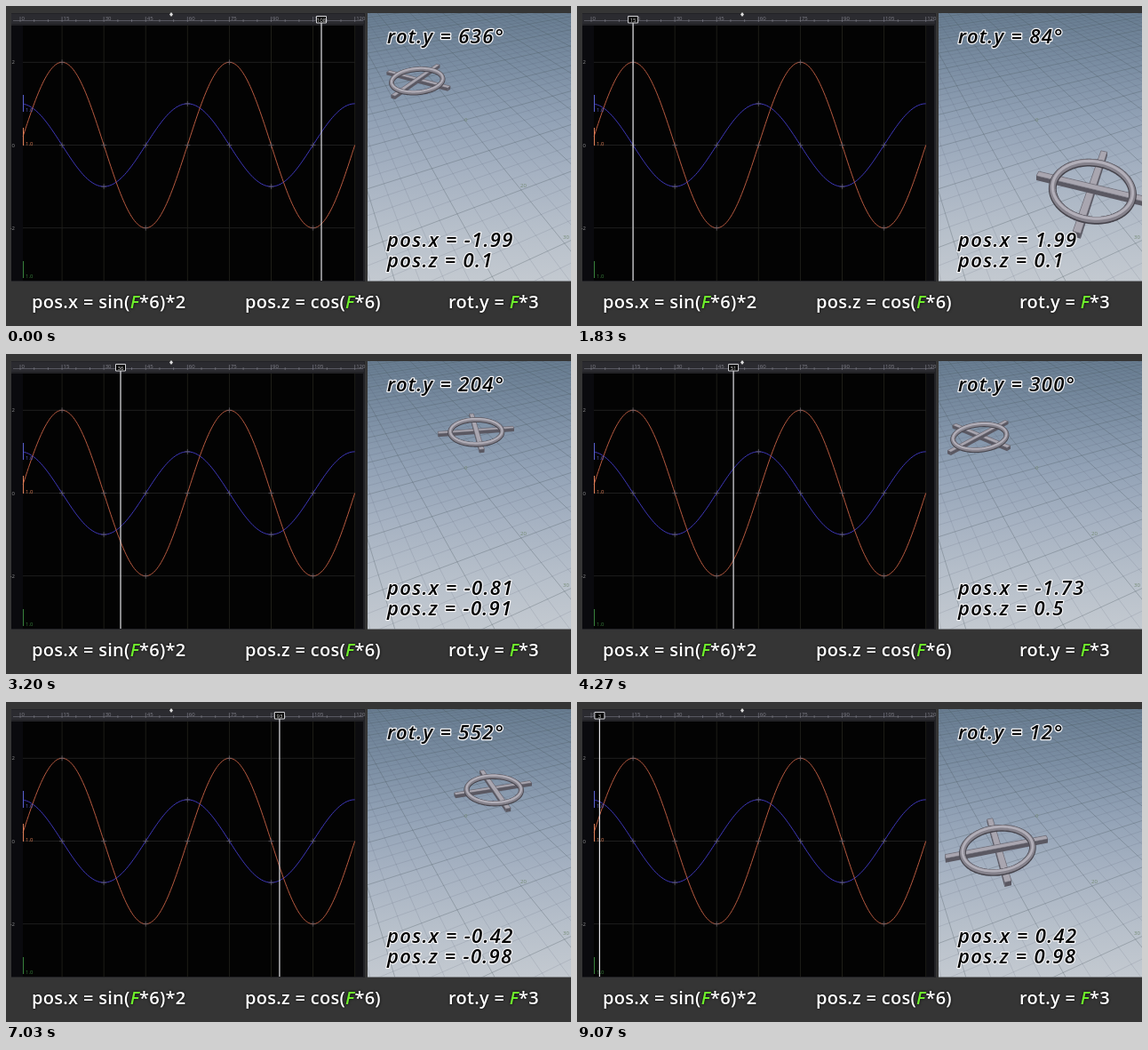
An HTML page with a canvas that plays this animation: 636x360 px, repeating every 9130 ms.

```html
<!DOCTYPE html>
<html lang="en">
<head>
<meta charset="utf-8">
<title>Sine and cosine motion</title>
<style>
html, body { margin: 0; width: 100%; height: 100%; overflow: hidden; background: #353535; }
canvas { display: block; }
</style>
</head>
<body>
<canvas id="stage" width="636" height="360"></canvas>
<script>
const W = 636, H = 360, LOOP = 9130, STEP = 1000 / 15, COUNT = 120;
const RAD = Math.PI / 180;
const SANS = '"Open Sans", "Noto Sans", sans-serif';
const ctx = document.getElementById('stage').getContext('2d');
const backdrop = document.createElement('canvas');
backdrop.width = W;
backdrop.height = H;
const bg = backdrop.getContext('2d');

const frameX = n => 16 + 3.139 * n;
const valueY = v => 156.5 - 46.6 * v;

// Perspective of the floor: x and z lie on the plane, h is height above it.
function project(x, z, h = 0) {
  const w = 1.06 - 0.122 * x - 0.057 * z;
  return [(547 - 36.9 * x - 87.7 * z) / w, (136.1 + 16.4 * x + 8.6 * z - 53 * h) / w];
}

function trace(c, points, close) {
  c.beginPath();
  points.forEach(p => c.lineTo(...p));
  if (close) c.closePath();
}

function line(c, points, color, width = 1) {
  trace(c, points);
  c.strokeStyle = color;
  c.lineWidth = width;
  c.stroke();
}

function rect(c, color, x, y, w, h) {
  c.fillStyle = color;
  c.fillRect(x, y, w, h);
}

function text(c, s, x, y, color, font, align = 'left') {
  c.font = font;
  c.textAlign = align;
  c.fillStyle = color;
  c.fillText(s, x, y);
}

const tiny = (c, s, x, y, color, align) => text(c, s, x, y, color, '6px ' + SANS, align);

function curve(f, color) {
  const points = [];
  for (let n = 1; n <= COUNT; n += 0.5) points.push([frameX(n), valueY(f(n))]);
  line(bg, points, color, 1);
  for (let n = 15; n < COUNT; n += 15) {
    const x = frameX(n), y = valueY(f(n));
    line(bg, [[x - 3, y], [x + 3, y]], '#6a6670', 0.7);
    line(bg, [[x, y - 3], [x, y + 3]], '#6a6670', 0.7);
  }
}

function drawGraph() {
  rect(bg, '#222226', 6, 8, 398, 302);
  rect(bg, '#2b2b30', 6, 9, 397, 11);
  rect(bg, '#030303', 6, 22, 387, 287);
  rect(bg, '#0c0c0f', 393, 22, 9, 287);
  rect(bg, '#0a0a0e', 6, 22, 13, 287);
  line(bg, [[8, 16.5], [402, 16.5]], '#6c6c78', 0.7);
  for (let n = 0; n <= COUNT; n += 5) {
    const x = frameX(n);
    line(bg, [[x, n % 15 ? 15 : 12], [x, 18]], '#82828c', 0.6);
  }
  for (let n = 0; n <= COUNT; n += 15) {
    const x = frameX(n);
    tiny(bg, n, x + 1.5, 16, '#80808a');
    if (n) line(bg, [[x, 22], [x, 309]], '#1e1e18', 1);
  }
  for (const v of [2, 0, -2]) {
    line(bg, [[19, valueY(v)], [393, valueY(v)]], '#1e1e1e', 1);
    tiny(bg, v, 10, valueY(v) + 2, '#909090', 'right');
  }
  curve(n => Math.cos(6 * n * RAD), '#3f38bc');
  curve(n => 2 * Math.sin(6 * n * RAD), '#b85a40');
  const axes = [['#5a60d0', 100, 119], ['#e08058', 137, 157], ['#38803c', 287, 306]];
  for (const [color, top, bottom] of axes) {
    line(bg, [[19.5, top], [19.5, bottom]], color);
    tiny(bg, '1.0', 22, bottom, color);
  }
  bg.fillStyle = '#dcdcdc';
  trace(bg, [[186, 7], [188, 9.5], [186, 12], [184, 9.5]], true);
  bg.fill();
}

function drawFloor() {
  bg.save();
  bg.beginPath();
  bg.rect(407, 8, 229, 301.5);
  bg.clip();
  const down = bg.createLinearGradient(0, 8, 0, 309);
  ['#687d91', '#7b8ea3', '#92a2b6', '#a6b2c2', '#b6bfca', '#c3c9d0']
    .forEach((c, i) => down.addColorStop(i / 5, c));
  rect(bg, down, 407, 8, 229, 302);

  const shade = v => v % 1 ? 'rgba(70,80,98,.18)' : 'rgba(70,84,90,.38)';
  for (let x = -8; x <= 4; x += 0.25) line(bg, [project(x, -7), project(x, 3)], shade(x), 0.8);
  for (let z = -7; z <= 3; z += 0.25) line(bg, [project(-9, z), project(4, z)], shade(z), 0.8);
  tiny(bg, '0', 516, 130, '#748a74');
  tiny(bg, '20', 579, 204, '#748a74');
  tiny(bg, '30', 627, 262, '#748a74');
  bg.restore();
}

function formula(x, before, after) {
  const font = '600 20px ' + SANS;
  bg.shadowColor = '#000';
  bg.shadowBlur = 3;
  bg.letterSpacing = '.3px';
  for (const [s, color] of [[before, '#fff'], ['F', '#6ff02c'], [after, '#fff']]) {
    bg.font = (s === 'F' ? 'italic ' : '') + font;
    text(bg, s, x, 340, color, bg.font);
    x += bg.measureText(s).width;
  }
  bg.letterSpacing = '0px';
  bg.shadowBlur = 0;
}

function drawBar(cx, cz, angle) {
  const c = Math.cos(angle), s = Math.sin(angle), long = 0.84, half = 0.05;
  const corners = [[1, 1], [1, -1], [-1, -1], [-1, 1]].map(([a, b]) =>
    [cx + a * long * c - b * half * s, cz + a * long * s + b * half * c]);
  const top = corners.map(p => project(...p, 0.06));
  const base = corners.map(p => project(...p, -0.02));
  ctx.fillStyle = '#5a5862';
  top.forEach((p, i) => {
    const j = (i + 1) % 4;
    trace(ctx, [p, top[j], base[j], base[i]], true);
    ctx.fill();
  });
  trace(ctx, top, true);
  ctx.fillStyle = '#a9a6b0';
  ctx.fill();
  ctx.strokeStyle = '#5e5c66';
  ctx.lineWidth = 0.5;
  ctx.stroke();
}

function drawRing(cx, cz) {
  const size = 7.2 / (1.06 - 0.122 * cx - 0.057 * cz);
  const layers = [['#45434b', 1, 0.02], ['#85828c', 0.78, 0.03], ['#b2afb9', 0.35, 0.05]];
  for (const [color, width, h] of layers) {
    const points = [];
    for (let a = 0; a < 360; a += 4) {
      points.push(project(cx + 0.57 * Math.cos(a * RAD), cz + 0.57 * Math.sin(a * RAD), h));
    }
    trace(ctx, points, true);
    ctx.strokeStyle = color;
    ctx.lineWidth = size * width;
    ctx.stroke();
  }
}

function readout(s, y) {
  ctx.letterSpacing = '1.35px';
  ctx.font = 'italic 600 22px ' + SANS;
  ctx.textAlign = 'left';
  ctx.lineJoin = 'round';
  ctx.lineWidth = 2.6;
  ctx.strokeStyle = '#f2f2f4';
  ctx.strokeText(s, 429, y);
  text(ctx, s, 429, y, '#000', ctx.font);
  ctx.letterSpacing = '0px';
}

function draw(t) {
  // Playback drops a moment after the first part.
  const clock = t + (t < 3750 ? 8 : -22);
  const n = (107 + Math.floor(clock / STEP)) % COUNT + 1;
  ctx.drawImage(backdrop, 0, 0);

  const x = frameX(n);
  line(ctx, [[x, 19], [x, 309]], '#e4e4e8', 1.2);
  rect(ctx, '#000', x - 5.5, 11.5, 11, 7.5);
  ctx.strokeStyle = '#d4d4d8';
  ctx.lineWidth = 1;
  ctx.strokeRect(x - 5.5, 11.5, 11, 7.5);
  tiny(ctx, n, x, 17.5, '#f0f0f0', 'center');

  ctx.save();
  ctx.beginPath();
  ctx.rect(407, 8, 229, 301.5);
  ctx.clip();
  const px = 2 * Math.sin(6 * n * RAD), pz = Math.cos(6 * n * RAD);
  drawBar(px, pz, 3 * n * RAD);
  drawBar(px, pz, (3 * n + 90) * RAD);
  drawRing(px, pz);
  ctx.restore();

  // The readouts refresh on every second step.
  const angle = 12 * Math.floor((n - 1) / 2);
  const short = v => String(+v.toFixed(2));
  readout(`rot.y = ${angle}°`, 42);
  readout('pos.x = ' + short(2 * Math.sin(angle * RAD)), 271);
  readout('pos.z = ' + short(Math.cos(angle * RAD)), 294);
}

rect(bg, '#353535', 0, 0, W, H);
drawGraph();
drawFloor();
formula(29, 'pos.x = sin(', '*6)*2');
formula(269, 'pos.z = cos(', '*6)');
formula(498, 'rot.y = ', '*3');

const start = performance.now();
function tick() {
  draw((performance.now() - start) % LOOP);
  requestAnimationFrame(tick);
}
tick();
</script>
</body>
</html>
```
